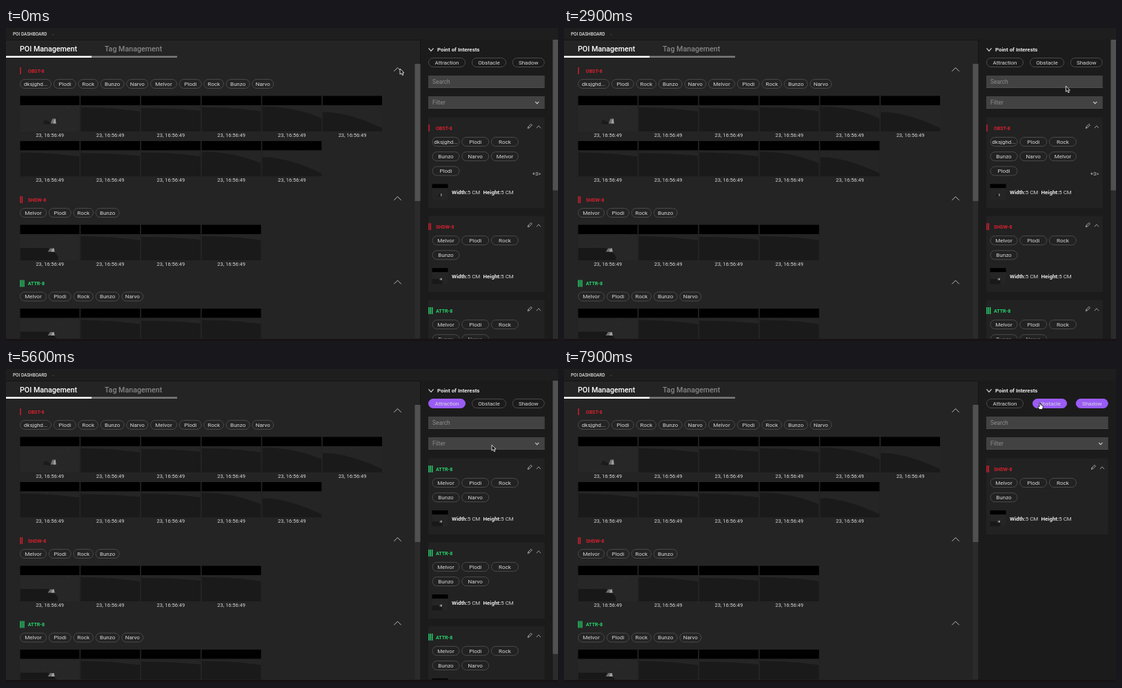
Write an HTML page with a canvas that moves like this. It is 800 by 454 pixels and loops after 8000 ms.

```html
<!DOCTYPE html>
<html lang="en">
<head>
<meta charset="utf-8">
<title>POI dashboard</title>
<style>
html, body { margin: 0; width: 100%; height: 100%; overflow: hidden; background: #1b1b1b; }
canvas { display: block; width: 800px; height: 454px; }
</style>
</head>
<body>
<canvas id="stage"></canvas>
<script>
const LOOP = 8000, STEP = 100;
const RED = '#d5202f', GREEN = '#27d36c', PURPLE = '#9a5cf5', CARD = '#222222';
const canvas = document.getElementById('stage');
const ctx = canvas.getContext('2d');
const dpr = window.devicePixelRatio || 1;
canvas.width = 800 * dpr;
canvas.height = 454 * dpr;

const NAMES = ['Melvor', 'Plodi', 'Rock', 'Bunzo', 'Narvo'];
const LONG = 'dksjghd...';
const CHIP_W = { [LONG]: 46, Melvor: 39, Plodi: 33, Rock: 29.5, Bunzo: 35, Narvo: 32 };
const OBST = { name: 'OBST-8', bars: 1, color: RED, images: 11,
  tags: [LONG, ...NAMES.slice(1), ...NAMES] };
const SHDW = { name: 'SHDW-8', bars: 2, color: RED, images: 4, tags: NAMES.slice(0, 4) };
const ATTR = { name: 'ATTR-8', bars: 3, color: GREEN, images: 4, tags: NAMES };
const SECTIONS = [OBST, SHDW, ATTR, ATTR];
const ALL_CARDS = [OBST, SHDW, ATTR, ATTR, ATTR, SHDW];

// time, x, y of the pointer tip
const PATH = [
  [0, 571, 59], [500, 567.5, 59], [1800, 567.5, 59], [2500, 740, 85], [2800, 730, 85],
  [3600, 668, 66], [3800, 644.5, 52.5], [4600, 644.5, 52.5], [5300, 702.5, 109],
  [5500, 702.5, 109], [5900, 712, 116.5], [6100, 712, 116.5], [6300, 644.5, 52.5],
  [6400, 644.5, 52.5], [6600, 751, 49.5], [7800, 751, 49.5], [7900, 690, 49]
];

// ridge of each sonar strip: start y, knee x, knee y, end y
const RIDGES = [[3, 45, 3, 9], [4, 45, 4, 8], [3, 50, 3, 9], [2, 48, 2, 19], [10, 34, 9, 33]];

function pointerAt(t) {
  for (let i = 1; i < PATH.length; i++) {
    const [t0, x0, y0] = PATH[i - 1], [t1, x1, y1] = PATH[i];
    if (t <= t1) {
      const k = (t - t0) / (t1 - t0), e = k * k * (3 - 2 * k);
      return { x: x0 + (x1 - x0) * e, y: y0 + (y1 - y0) * e };
    }
  }
  const [, x, y] = PATH[PATH.length - 1];
  return { x, y };
}

function rect(x, y, w, h, color) {
  ctx.fillStyle = color;
  ctx.fillRect(x, y, w, h);
}

// Draws the string and returns the x where it ends.
function text(str, x, y, size, color = '#d8d8d8', weight = 400, align = 'left') {
  ctx.font = `${weight} ${size}px Roboto, sans-serif`;
  ctx.textAlign = align;
  ctx.textBaseline = 'alphabetic';
  ctx.fillStyle = color;
  ctx.fillText(str, x, y + size * 0.355);
  return x + ctx.measureText(str).width;
}

function line(points, color, width = 1) {
  ctx.beginPath();
  points.forEach(([x, y]) => ctx.lineTo(x, y));
  ctx.strokeStyle = color;
  ctx.lineWidth = width;
  ctx.stroke();
}

function poly(points, color) {
  ctx.beginPath();
  points.forEach(([x, y]) => ctx.lineTo(x, y));
  ctx.closePath();
  ctx.fillStyle = color;
  ctx.fill();
}

function chevron(x, y, half, dy, color, width = 1) {
  line([[x - half, y + dy / 2], [x, y - dy / 2], [x + half, y + dy / 2]], color, width);
}

function chip(label, x, y, w, on) {
  const h = 14;
  ctx.beginPath();
  ctx.roundRect(x + 0.5, y - h / 2 + 0.5, w - 1, h - 1, h / 2);
  if (on) {
    ctx.fillStyle = PURPLE;
    ctx.fill();
  }
  ctx.strokeStyle = on ? PURPLE : '#4a4a4a';
  ctx.lineWidth = 1;
  ctx.stroke();
  text(label, x + w / 2, y, 8, '#d8d8d8', 400, 'center');
}

function clipped(x, y, w, h, draw) {
  ctx.save();
  ctx.beginPath();
  ctx.rect(x, y, w, h);
  ctx.clip();
  draw();
  ctx.restore();
}

function bars(item, x, y) {
  for (let i = 0; i < item.bars; i++) rect(x + i * 2.4, y - 5, 1.4, 10, item.color);
}

function specks(x, y, w, h, count, seed) {
  for (let i = 0; i < count; i++) {
    seed = (seed * 16807) % 2147483647;
    const px = seed % 997 / 997;
    seed = (seed * 16807) % 2147483647;
    rect(x + px * w, y + (seed % 991 / 991) * h, 0.9, 0.9, 'rgba(150,150,150,.16)');
  }
}

function rock(x, y, w, h) {
  poly([[x - w, y + h], [x - w * 0.3, y - h], [x + w * 0.8, y - h], [x + w, y + h]], '#6f6f6f');
  poly([[x, y + h], [x + w * 0.3, y - h * 0.6], [x + w * 0.8, y - h], [x + w, y + h]], '#a0a0a0');
}

function ridge(x, y, kind) {
  const [start, kneeX, kneeY, end] = RIDGES[kind];
  rect(x, y, 86, 38, '#1a1a1a');
  ctx.beginPath();
  ctx.moveTo(x, y);
  ctx.lineTo(x, y + start);
  ctx.quadraticCurveTo(x + kneeX, y + kneeY, x + 86, y + end);
  ctx.lineTo(x + 86, y);
  ctx.fillStyle = '#252525';
  ctx.fill();
  specks(x, y, 86, 7, 4, 37 + kind * 11);
}

function thumb(item, i, x, y) {
  rect(x, y, 86, 13.5, '#000');
  const top = y + 13.5;
  clipped(x, top, 86, 38, () => {
    if (i > 0) {
      ridge(x, top, (i - 1) % 5);
      return;
    }
    rect(x, top, 86, 38, '#272727');
    specks(x, top, 86, 38, 20, 71);
    if (item === OBST) {
      poly([[x + 33, top + 27], [x + 36, top + 21], [x + 45, top + 25], [x + 43, top + 28]], '#1b1b1b');
      rock(x + 48, top + 23, 4, 3.5);
    } else {
      ctx.beginPath();
      ctx.moveTo(x, top + 20);
      ctx.lineTo(x + 40, top + 20);
      ctx.bezierCurveTo(x + 52, top + 26, x + 58, top + 34, x + 54, top + 38);
      ctx.lineTo(x, top + 38);
      ctx.fillStyle = '#181818';
      ctx.fill();
      rock(x + 45, top + 23, 5, 2.6);
    }
  });
}

function section(item, y, open, hot) {
  bars(item, 20.3, y);
  text(item.name, 31.8, y + 0.5, 7, item.color, 700);
  chevron(567.5, y - 1.8, 5.2, open ? 5.2 : -5.2, hot ? PURPLE : '#cccccc', 0.9);
  let x = 20;
  item.tags.forEach(tag => {
    chip(tag, x, y + 19, CHIP_W[tag]);
    x += CHIP_W[tag] + 2.7;
  });
  if (!open) return;
  for (let i = 0; i < item.images; i++) {
    const tx = 20.5 + (i % 6) * 87.7, ty = y + 36.5 + Math.floor(i / 6) * 65.5;
    thumb(item, i, tx, ty);
    text('23, 16:56:49', tx + 43, ty + 56.8, 7.5, '#d8d8d8', 400, 'center');
  }
}

function leftPanel(open, hot) {
  rect(0, 18, 600, 433, '#242424');
  text('POI Management', 20, 30, 10.7, '#ffffff', 500);
  text('Tag Management', 143, 30, 10.7, '#858585', 500);
  rect(0, 40.5, 124, 2.5, '#ffffff');
  rect(124, 40.5, 124, 2.5, '#7c7c7c');
  clipped(0, 44, 600, 406.5, () => {
    let y = 62;
    SECTIONS.forEach((item, i) => {
      const shown = i > 0 || open;
      section(item, y, shown, i === 0 && hot);
      y += shown ? (item === OBST ? 187 : 121.5) : 56;
    });
  });
  rect(592.5, 52, 8, 398, '#2b2b2b');
  rect(592.5, 52, 8, 398 * 398 / (open ? 796 : 665), '#515151');
}

function pencil(x, y) {
  ctx.save();
  ctx.translate(x, y);
  ctx.rotate(-Math.PI / 4);
  ctx.strokeStyle = '#b8b8b8';
  ctx.lineWidth = 0.8;
  ctx.strokeRect(-2.2, -1.1, 5.6, 2.2);
  line([[-2.2, -1.1], [-4.2, 0], [-2.2, 1.1]], '#b8b8b8', 0.8);
  ctx.restore();
}

const cardRows = item => item === OBST ? 3 : 2;

function measure(label, x, y) {
  const end = text(label, x, y, 7.9, '#e8e8e8', 700);
  text('5 CM', end, y, 7.9);
}

function card(item, y, right) {
  const rows = cardRows(item), base = y + 33.2 + 21.2 * rows;
  rect(612, y, right - 612, 68 + rows * 21.3, CARD);
  bars(item, 612.2, y + 15.5);
  text(item.name, 623, y + 15.8, 7, item.color, 700);
  pencil(right - 21.5, y + 13);
  chevron(right - 8.8, y + 14, 3, 3.4, '#b8b8b8', 0.8);
  item.tags.slice(0, 7).forEach((tag, i) => {
    chip(tag, 617.5 + (i % 3) * 42.7, y + 35.5 + Math.floor(i / 3) * 21.2, 40);
  });
  if (item === OBST) text('+3>', right - 18, y + 82, 7.6, '#c8c8c8');
  rect(617.5, base, 23, 6, '#000');
  rect(617.5, base + 6, 23, 17, '#252525');
  if (item === OBST) {
    poly([[625, base + 20], [628, base + 14], [630, base + 16]], '#191919');
    rect(630, base + 14, 1.5, 3.5, '#8c8c8c');
  } else {
    rect(617.5, base + 16, 15, 7, '#181818');
    rock(630, base + 16, 2, 1.4);
  }
  measure('Width:', 646, base + 12, 7.9);
  measure('Height:', 691.5, base + 12, 7.9);
}

function field(label, y, right) {
  rect(612, y - 9, right - 612, 18, '#424242');
  rect(612, y + 8.3, right - 612, 0.7, '#555555');
  text(label, 618, y + 0.3, 8.4, '#8c8c8c');
}

function rightPanel(cards, scroll, on) {
  const right = scroll ? 780.7 : 788.7, mid = scroll ? 675 : 679;
  rect(601, 17, 199, 434, '#1b1b1b');
  chevron(616, 31.3, 3.5, -4, '#e0e0e0', 1.1);
  text('Point of Interests', 625, 31.3, 7.9, '#e8e8e8', 700);
  chip('Attraction', 612, 50, 54, on.attraction);
  chip('Obstacle', mid, 50, 50, on.obstacle);
  chip('Shadow', right - 47, 50, 47, on.shadow);
  field('Search', 78, right);
  field('Filter', 108, right);
  chevron(right - 11, 108.2, 2.6, -2.8, '#cccccc', 1.1);
  let y = 129.5;
  clipped(601, 17, 199, 433.5, () => cards.forEach(item => {
    card(item, y, right);
    y += 79.5 + cardRows(item) * 21.2;
  }));
  if (scroll) {
    rect(792.5, 17, 7.5, 434, '#2b2b2b');
    rect(792.5, 17, 7.5, 434 * 434 / (y - 20), '#515151');
  }
}

function outlined(points, fill, stroke) {
  ctx.lineJoin = 'round';
  poly(points, fill);
  line([...points, points[0]], stroke, 0.9);
  ctx.lineJoin = 'miter';
}

function pointer({ x, y }, hand) {
  ctx.save();
  ctx.translate(x, y);
  if (hand) {
    outlined([[-1, 0], [0.6, 0], [0.9, 3], [4, 4], [4.3, 6.5], [3.3, 9.6], [-1.2, 9.6],
      [-3.4, 6], [-2.8, 5], [-1, 6]], '#ffffff', '#181818');
  } else {
    outlined([[0, 0], [0, 8.2], [2, 6.5], [3.5, 9.6], [4.9, 9], [3.5, 6], [6, 5.9]], '#101010', '#e8e8e8');
  }
  ctx.restore();
}

function draw(t) {
  const between = (a, b) => t >= a && t < b;
  const onSection = between(400, 1900), onAttraction = between(3800, 4700) || between(6300, 6500);
  const onShadow = between(6600, 7900), onObstacle = t >= 7900;
  const attraction = between(4100, 6300), shadow = t >= 6600;
  const cards = attraction ? [ATTR, ATTR, ATTR] : shadow ? [SHDW] : ALL_CARDS;

  ctx.setTransform(dpr, 0, 0, dpr, 0, 0);
  rect(0, 0, 800, 454, '#171314');
  rect(0, 0, 800, 17, '#1e1e1e');
  text('POI DASHBOARD', 10, 9, 6.4, '#e0e0e0', 500);
  rect(67, 9, 2.5, 0.8, '#4a4a4a');
  leftPanel(!between(900, 1400), onSection);
  rightPanel(cards, !shadow, {
    attraction: attraction || onAttraction,
    obstacle: onObstacle,
    shadow
  });
  pointer(pointerAt(t), onSection || onAttraction || onShadow || onObstacle);
}

function tick() {
  draw(Math.floor((performance.now() % LOOP) / STEP) * STEP);
  requestAnimationFrame(tick);
}
tick();
</script>
</body>
</html>
```
